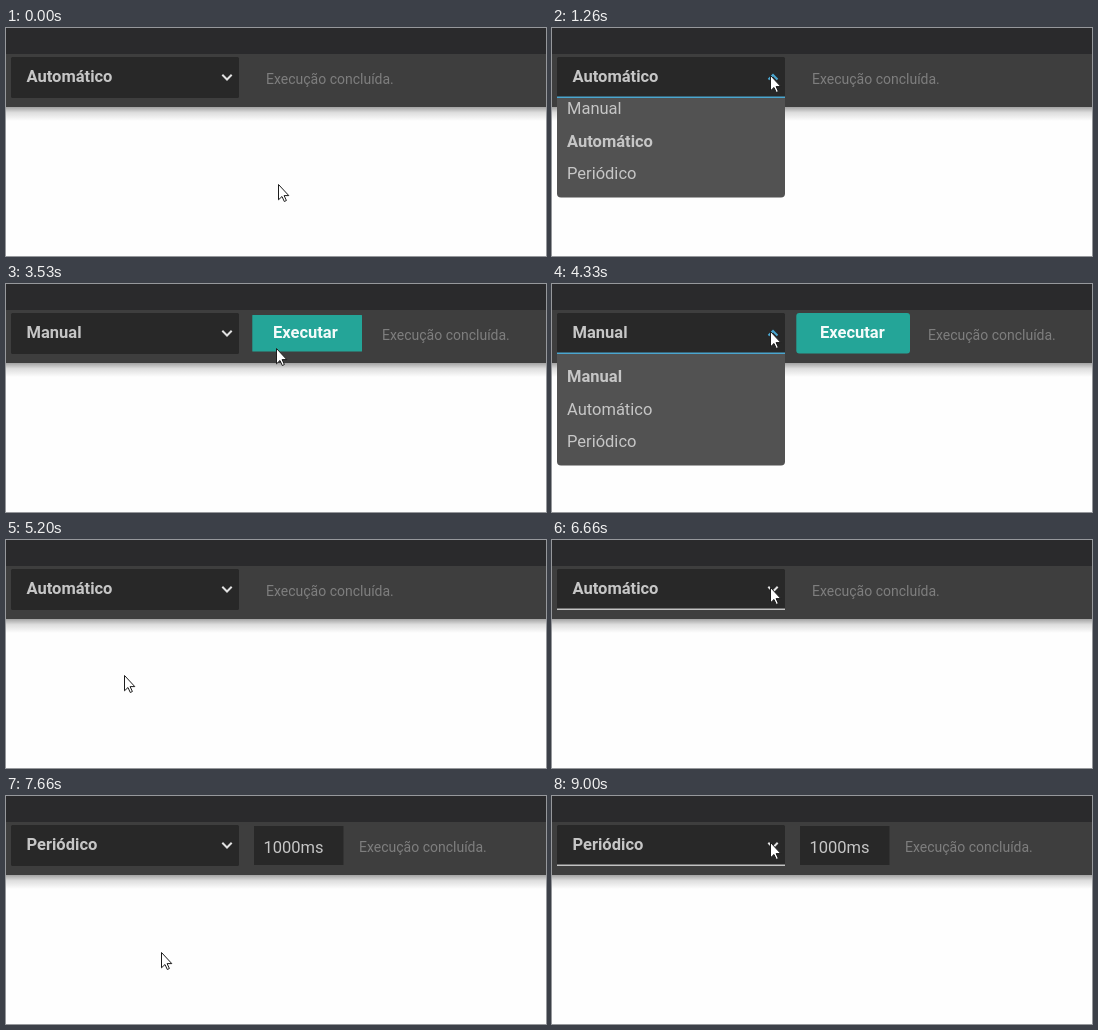
Write an HTML page that moves like this. It is 540x228 px and loops after 9260 ms.

```html
<!DOCTYPE html>
<html lang="pt">
<head>
<meta charset="utf-8">
<title>Modo de execução</title>
<style>
  html, body { margin: 0; width: 100%; height: 100%; overflow: hidden; background: #fefefe; }
  svg { display: block; width: 540px; height: 228px; }
  text { font: 16.5px Roboto, "Open Sans", sans-serif; fill: #c6c6c6; white-space: pre; }
  .bold { font-weight: 600; }
  #status { font-size: 14px; fill: #7e7e7e; }
  #action { fill: #f4fbfa; }
  #chevron { fill: none; stroke-width: 2; }
</style>
</head>
<body>
<svg viewBox="0 0 540 228">
  <defs>
    <linearGradient id="shade" x1="0" y1="0" x2="0" y2="1">
      <stop offset="0" stop-opacity=".36"/>
      <stop offset=".4" stop-opacity=".13"/>
      <stop offset="1" stop-opacity="0"/>
    </linearGradient>
    <clipPath id="below"><rect y="70" width="540" height="158"/></clipPath>
  </defs>

  <rect width="540" height="228" fill="#fefefe"/>
  <rect y="79" width="540" height="14" fill="url(#shade)"/>
  <rect width="540" height="26" fill="#2a2a2c"/>
  <rect y="26" width="540" height="53" fill="#3e3e3e"/>

  <g clip-path="url(#below)">
    <g id="menu">
      <rect x="5" y="65" width="228" height="116.5" rx="4" fill="#525252"/>
      <rect id="row" x="10" width="218" height="32" fill="#434343"/>
      <g id="items"></g>
    </g>
  </g>

  <rect x="5" y="29" width="228" height="41" rx="1.5" fill="#282828"/>
  <rect id="line" x="5" y="68.5" width="228" height="1.5"/>
  <text id="value" class="bold" x="20.5" y="54"></text>
  <path id="chevron"/>

  <g id="run">
    <rect id="button"/>
    <text id="action" class="bold" y="54">Executar</text>
  </g>
  <g id="period">
    <rect x="248" y="30" width="89.5" height="39" fill="#282828"/>
    <text x="257.5" y="57">1000ms</text>
  </g>
  <text id="status" y="56">Execução concluída.</text>

  <path id="cursor" d="M.5 .5V15.8L4 12.5 6.3 17.5 8.4 16.5 6.1 11.6H10.8Z"
        fill="#fff" stroke="#1c1c1c" stroke-linejoin="round"/>
</svg>
<script>
const LOOP = 9260;
const MODES = ["Manual", "Automático", "Periódico"];
const ROW_TOP = 77, ROW_STEP = 32.6;

// Ticks are 1/15 s. Each move: first tick, last tick, end point.
const START = [272, 156];
const MOVES = [
  [4, 13, 218, 47],
  [25, 28, 162, 100],
  [38, 45, 270, 64],
  [54, 58, 218, 47],
  [72, 75, 118, 135],
  [90, 100, 218, 47],
  [103, 112, 155, 156],
  [123, 135, 218, 46]
];
// Each menu use: click, first drawn tick, selection, chosen mode.
const PICKS = [
  [16, 18, 30, 0],
  [63, 63, 78, 1],
  [102, 102, 114, 2]
];
const SLIDE = [-23, -12, 0];

const $ = id => document.getElementById(id);
const set = (id, attrs) => {
  for (const name in attrs) $(id).setAttribute(name, attrs[name]);
};
const show = (id, on) => set(id, { visibility: on ? "visible" : "hidden" });

const labels = MODES.map((mode, i) => {
  const label = document.createElementNS("http://www.w3.org/2000/svg", "text");
  label.textContent = mode;
  label.setAttribute("x", 15);
  label.setAttribute("y", 98 + i * ROW_STEP);
  $("items").append(label);
  return label;
});

function ease(p) {
  const a = p ** 1.7, b = (1 - p) ** 1.7;
  return a / (a + b);
}

function pointer(tick) {
  let [x, y] = START;
  for (const [first, last, endX, endY] of MOVES) {
    if (tick < first) break;
    const p = ease(Math.min(1, (tick - first + 1) / (last - first + 1)));
    x += (endX - x) * p;
    y += (endY - y) * p;
  }
  return [Math.round(x), Math.round(y)];
}

const inside = ([x, y], left, top, right, bottom) =>
  x >= left && x < right && y >= top && y < bottom;

function drawSelect(tick, at, mode) {
  const pick = PICKS.find(([click, , done]) => tick >= click && tick < done);
  const hover = inside(at, 5, 29, 233, 70);
  const menuAge = pick ? tick - pick[1] : -1;
  const row = Math.floor((at[1] - ROW_TOP) / ROW_STEP);

  $("value").textContent = MODES[mode];
  set("line", { fill: pick ? "#4ba6cf" : "#c2c2c2" });
  show("line", pick || hover);
  set("chevron", {
    d: pick ? "M216.5 51.5L221 47L225.5 51.5" : "M216.3 46.8L221 51.5L225.7 46.8",
    stroke: pick ? "#4ba6cf" : "#e2e2e2"
  });

  show("menu", menuAge >= 0);
  set("menu", { transform: `translate(0 ${SLIDE[Math.max(0, Math.min(2, menuAge))]})` });
  show("row", menuAge > 2 && row >= 0 && row < 3);
  set("row", { y: ROW_TOP + Math.round(row * ROW_STEP) });
  labels.forEach((label, i) => label.classList.toggle("bold", i === mode));
}

function drawTools(tick, at, mode) {
  const hover = inside(at, 244, 29, 358, 70);
  const pressed = tick >= 48 && tick < 51;
  const inset = hover && tick >= 48 ? 2 : 0;
  const period = mode === 2 && tick >= 115;

  show("run", mode === 0);
  set("button", {
    x: 244.3 + inset, y: 29 + inset,
    width: 113.7 - 2 * inset, height: 40.5 - 2 * inset,
    rx: inset ? 0.5 : 3,
    fill: pressed ? "#1d8d82" : hover && !inset ? "#2aaea0" : "#24a598"
  });
  set("action", { x: inset ? 267 : 268 });
  show("period", period);
  set("status", { x: mode === 0 ? 376 : period ? 353 : 260 });
}

function draw(time) {
  const ms = Math.floor((time % LOOP) / 10) * 10;
  const tick = Math.floor((ms + 7) * 0.015);
  const at = pointer(tick);
  const mode = PICKS.reduce((now, [, , done, next]) => tick >= done ? next : now, 1);

  drawSelect(tick, at, mode);
  drawTools(tick, at, mode);
  set("cursor", { transform: `translate(${at[0]} ${at[1]})` });
}

let origin;
function loop(now) {
  origin ??= now;
  draw(now - origin);
  requestAnimationFrame(loop);
}
draw(0);
requestAnimationFrame(loop);
</script>
</body>
</html>
```
